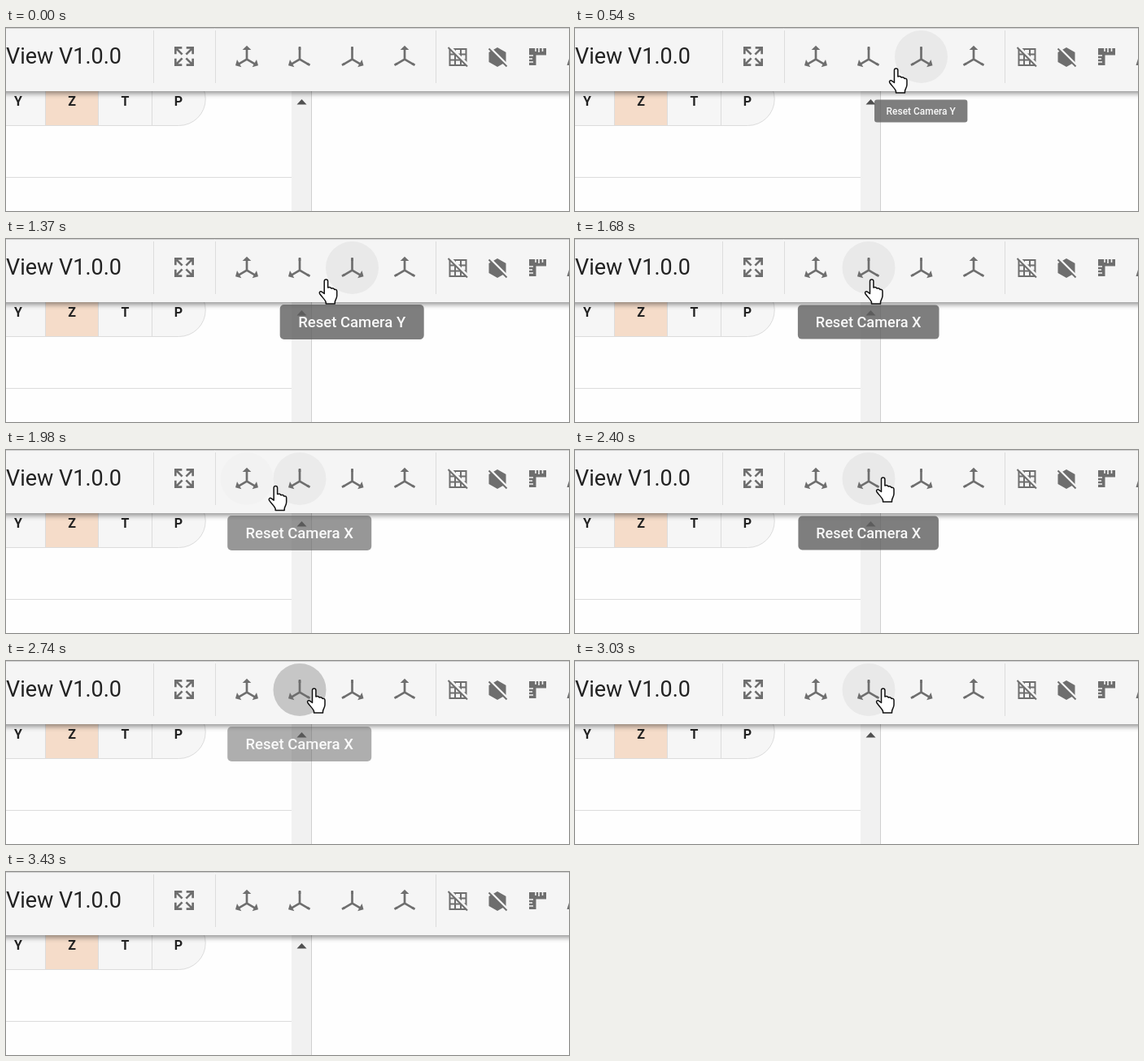
Animation of 692x226 px, one loop 3.97 s. Source, as an HTML page:

```html
<!DOCTYPE html>
<html lang="en">
<head>
<meta charset="utf-8">
<title>Camera toolbar</title>
<style>
html, body { margin: 0; width: 100%; height: 100%; overflow: hidden; background: #fefefe; }
svg { display: block; width: 692px; height: 226px; font-family: Roboto, Arial, sans-serif; }
.bar { fill: #f5f5f5; filter: drop-shadow(0 3px 3px rgba(0,0,0,.42)); }
.line { stroke: #dcdcdc; fill: none; }
.tabs text { font-weight: 700; font-size: 16px; fill: #222; text-anchor: middle; }
.icon { fill: #6e6e6e; stroke: none; }
.stroke { fill: none; stroke: #6e6e6e; stroke-width: 2; }
.gap { fill: none; stroke: #f5f5f5; }
.tip rect { fill: #616161; fill-opacity: .81; }
.tip text { fill: #fff; fill-opacity: .95; font-size: 18.5px; font-weight: 500; text-anchor: middle; }
</style>
</head>
<body>
<svg viewBox="0 0 692 226">
  <defs>
    <path id="shafts" class="stroke" d="M12 4V14.7M12 14.7L4 19.35M12 14.7L20 19.35"/>
    <path id="stubUp" class="stroke" d="M12 3V6"/>
    <path id="stubLeft" class="stroke" d="M5 18.75L2.6 20.15"/>
    <path id="stubRight" class="stroke" d="M19 18.75L21.4 20.15"/>
    <path id="headUp" class="icon" d="M12 2L16 6H8Z"/>
    <path id="headLeft" class="icon" d="M1.5 20.5L3 15.03L7 21.96Z"/>
    <path id="headRight" class="icon" d="M22.5 20.5L21 15.03L17 21.96Z"/>
    <path id="corner" class="stroke" d="M4 10V4H10M4 4L10.2 10.2"/>
    <clipPath id="button"><circle cx="361" cy="35.5" r="32.5"/></clipPath>
  </defs>

  <g class="tabs">
    <path d="M-2 55H212.5A32.7 32.7 0 0 1 212.5 120.5H-2Z" fill="#f6f6f6" stroke="#dcdcdc"/>
    <rect x="49" y="55" width="64.5" height="65" fill="#f5dcc9"/>
    <path class="line" d="M48.5 55V120M113.5 55V120M179.5 55V120"/>
    <text x="15" y="95.5">Y</text><text x="81" y="95.5">Z</text>
    <text x="146.5" y="95.5">T</text><text x="212" y="95.5">P</text>
  </g>
  <path class="line" d="M0 184.5H351"/>
  <rect x="351" y="60" width="24" height="166" fill="#f1f1f1"/>
  <path d="M375.5 60V226" stroke="#cfcfcf"/>
  <path d="M357.5 94.5L363.5 88L369.5 94.5Z" fill="#505050"/>

  <rect class="bar" x="-20" y="-10" width="732" height="88"/>
  <path d="M0 .5H692" stroke="#cfcfcf"/>
  <path class="line" d="M181.5 3V68M257.5 3V68M528.5 3V68"/>
  <text x="0" y="44" font-size="27" fill="#222">View V1.0.0</text>

  <g id="hovers"></g>
  <circle id="ripple" cx="377" cy="35" clip-path="url(#button)"/>
  <g transform="translate(203 19) scale(1.333)">
    <use href="#corner"/>
    <use href="#corner" transform="rotate(90 12 12)"/>
    <use href="#corner" transform="rotate(180 12 12)"/>
    <use href="#corner" transform="rotate(270 12 12)"/>
  </g>
  <g id="axes"></g>

  <g transform="translate(555.5 36)">
    <path class="stroke" d="M-10-10H10V10H-10ZM-3.5-10V10M3.5-10V10M-10-3.5H10M-10 3.5H10"/>
    <path class="gap" stroke-width="3" d="M-10-13L13 10"/>
    <path class="stroke" stroke-width="2.4" d="M-12-12L11.5 11.5"/>
  </g>
  <g transform="translate(604 36)">
    <path class="icon" d="M0-12L10.5-6V6L0 12L-10.5 6V-6Z"/>
    <path class="gap" stroke-width="3" d="M-10-12.5L13 10.5"/>
    <path class="stroke" d="M-10.5-10.5L11.5 11.5"/>
  </g>
  <path class="icon" d="M643 25H664V33.5H651.5V46H643Z"/>
  <path class="gap" stroke-width="1.6" d="M651 25V29M655 25V30M659.5 25V29M643 34H648M643 38H647M643 42H648"/>
  <path class="icon" d="M692 38V46H689.5Z"/>

  <g id="tips"></g>
  <path id="hand" fill="#fff" stroke="#111" stroke-width="1.5" stroke-linejoin="round"
    d="M7.5 18.5V3.2a2.2 2.2 0 0 1 4.4 0V11c1.5-.9 4-.4 4.2 1.1c1.5-.7 3.4-.1 3.8 1.3c1.6-.4 3.1.3 3.1 2V21c0 4-2.5 5-2.5 8.5V31H9.5v-2c-1-3-4.5-6-7.7-10.5c-1-2 1-3.5 2.8-2.2Z"/>
</svg>
<script>
const LOOP = 3970;
const $ = id => document.getElementById(id);
const clamp = v => Math.min(1, Math.max(0, v));
const ramp = (t, start, length) => clamp((t - start) / length);
const easeOut = p => 1 - (1 - p) ** 3;
const smooth = p => p * p * (3 - 2 * p);

function add(parent, tag, attrs, text = '') {
  const el = document.createElementNS('http://www.w3.org/2000/svg', tag);
  for (const key in attrs) el.setAttribute(key, attrs[key]);
  el.textContent = text;
  return parent.appendChild(el);
}

// Axis buttons: each direction ends in an arrow head or a plain stub
[[296, 'Up Left Right'], [361, 'Left'], [425.5, 'Right'], [490, 'Up']].forEach(([x, heads]) => {
  const g = add($('axes'), 'g', { transform: `translate(${x - 16} 19) scale(1.333)` });
  add(g, 'use', { href: '#shafts' });
  for (const dir of ['Up', 'Left', 'Right'])
    add(g, 'use', { href: (heads.includes(dir) ? '#head' : '#stub') + dir });
});

// Hover and tooltip spans: [from, to]
const buttons = [
  { x: 296, label: 'Perspective view', width: 183.5, hover: [[1960, 2195]], tip: [[1993, 2195]] },
  { x: 361, label: 'Reset Camera X', width: 177, hover: [[1400, 1960], [2195, 3050]], tip: [[1483, 1960], [2210, 2702]] },
  { x: 425.5, label: 'Reset Camera Y', width: 177, hover: [[430, 1400]], tip: [[462, 1390]] }
];
for (const b of buttons) {
  b.circle = add($('hovers'), 'circle', { cx: b.x, cy: 35.5, r: 32.5 });
  b.box = add($('tips'), 'g', { class: 'tip' });
  add(b.box, 'rect', { x: -b.width / 2, y: -21.5, width: b.width, height: 43, rx: 5 });
  add(b.box, 'text', { y: 6.5 }, b.label);
}

// Pointer path: time, x, y, easing towards that point
const path = [
  [70, 585, 226],
  [510, 385, 49, p => 1 - (1 - p) ** 1.8],
  [760, 384, 49, smooth],
  [1370, 384, 49, smooth],
  [1680, 355, 49, easeOut],
  [1900, 354, 48.5, smooth],
  [2020, 311, 42, smooth],
  [2090, 311, 40, smooth],
  [2190, 359, 36, smooth],
  [2330, 369, 33, easeOut],
  [3030, 369, 33, smooth],
  [3430, 561, 226, p => p ** 1.5]
];

function pointer(t) {
  const i = path.findIndex(p => t < p[0]);
  if (i < 1) return null;
  const [t0, x0, y0] = path[i - 1], [t1, x1, y1, ease] = path[i];
  const k = ease((t - t0) / (t1 - t0));
  return [x0 + (x1 - x0) * k, y0 + (y1 - y0) * k];
}

function draw(t) {
  for (const b of buttons) {
    const hover = Math.max(...b.hover.map(([from, to]) => ramp(t, from, 90) * (1 - ramp(t, to, 90))));
    b.circle.setAttribute('opacity', hover * .05);

    const [from, to] = b.tip.findLast(span => t >= span[0]) || [LOOP, LOOP];
    const scale = easeOut(ramp(t, from, 270));
    b.box.setAttribute('transform', `translate(${b.x - .3} 102.5) scale(${scale})`);
    b.box.setAttribute('opacity', 1 - ramp(t, to, 105));
  }

  $('ripple').setAttribute('r', 52 * easeOut(ramp(t, 2450, 250)));
  $('ripple').setAttribute('opacity', .15 * (1 - ramp(t, 2750, 170)));

  const at = pointer(t);
  $('hand').setAttribute('visibility', at ? 'visible' : 'hidden');
  if (at) $('hand').setAttribute('transform', `translate(${at})`);
}

const start = performance.now();
function tick() {
  draw((performance.now() - start) % LOOP);
  requestAnimationFrame(tick);
}
tick();
</script>
</body>
</html>
```
